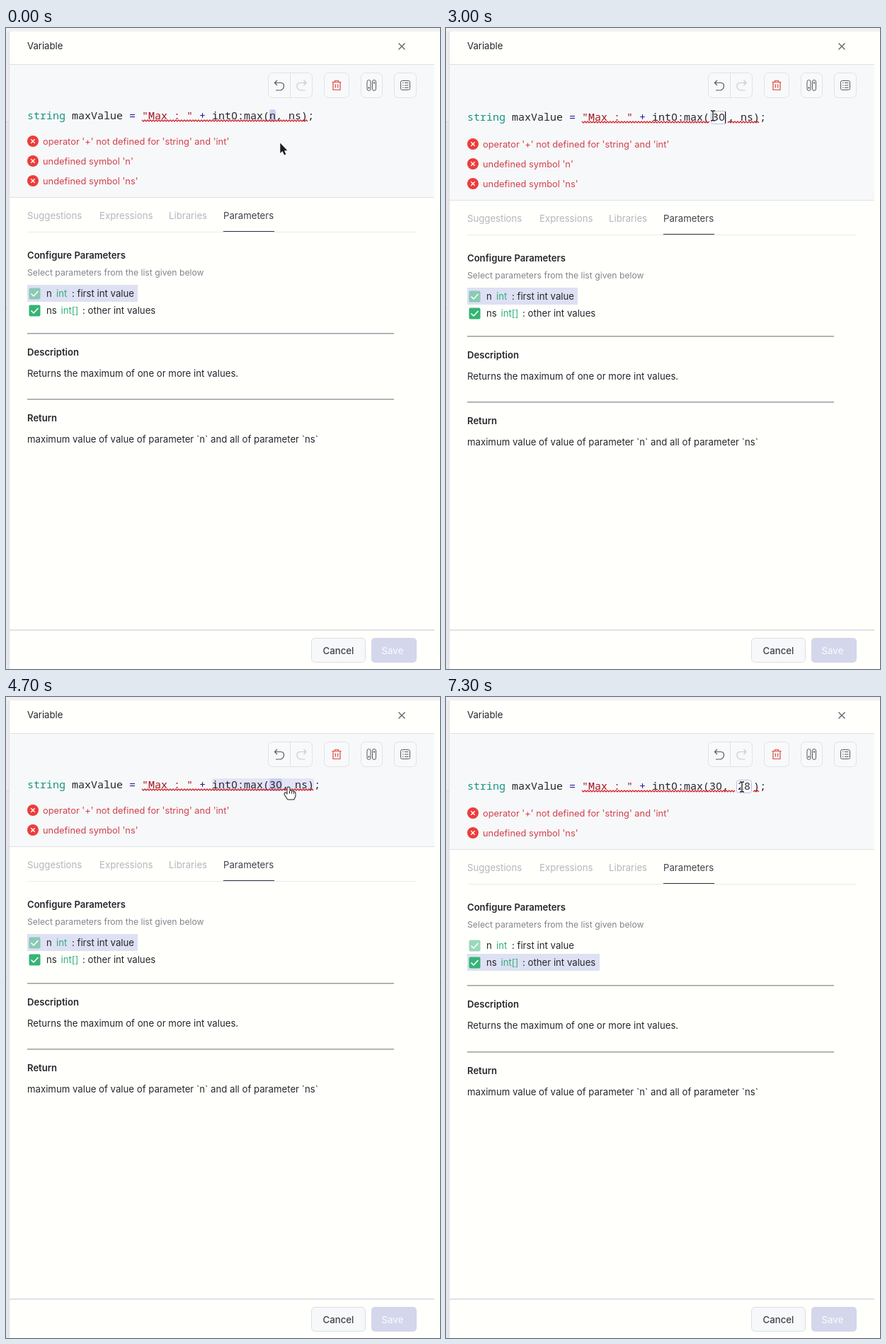
An HTML page with a canvas that plays this animation: 613 by 906 pixels, repeating every 8 s.

```html
<!DOCTYPE html>
<html lang="en">
<head>
<meta charset="utf-8">
<title>Variable editor</title>
<style>
html, body { margin: 0; width: 100%; height: 100%; overflow: hidden; background: #fffffc; }
canvas { display: block; width: 613px; height: 906px; }
</style>
</head>
<body>
<canvas id="stage"></canvas>
<script>
const W = 613, H = 906, LOOP = 8000, CELL = 9;
const canvas = document.getElementById('stage');
const ctx = canvas.getContext('2d');
const dpr = window.devicePixelRatio || 1;
canvas.width = W * dpr;
canvas.height = H * dpr;

const INK = '#25262c', RED = '#d0414e', GREEN = '#36b475', PALE = '#dee0f3';
const UI = 'Inter, "Open Sans", sans-serif';
const MONO = '15px "Noto Sans Mono", "DejaVu Sans Mono", monospace';
const ZERO = '15px "Noto Sans", "Open Sans", sans-serif';

// Each row applies from its time on: editor state.
const STATES = [
  { at: 0, args: ['n', 'ns'], pick: 0 },
  { at: 1300, args: ['n', 'ns'], pick: 0, edit: true, selected: true },
  { at: 2300, args: ['3', 'ns'], pick: 0, edit: true, caret: true },
  { at: 2500, args: ['3', 'ns'], pick: 0, edit: true },
  { at: 3000, args: ['30', 'ns'], pick: 0, edit: true, caret: true },
  { at: 3100, args: ['30', 'ns'], pick: 0, edit: true, caret: true, fixed: true },
  { at: 3400, args: ['30', 'ns'], pick: 0, fixed: true, gap: true },
  { at: 4100, args: ['30', 'ns'], pick: 0, fixed: true },
  { at: 4600, args: ['30', 'ns'], pick: 0, fixed: true, hover: 'call' },
  { at: 4900, args: ['30', 'ns'], pick: 0, fixed: true, hover: 'last' },
  { at: 5300, args: ['30', 'ns'], pick: 1, fixed: true },
  { at: 6000, args: ['30', 'ns'], pick: 1, fixed: true, edit: true, selected: true },
  { at: 6700, args: ['30', '2'], pick: 1, fixed: true, edit: true, caret: true },
  { at: 7200, args: ['30', '28'], pick: 1, fixed: true, edit: true, caret: true },
  { at: 7300, args: ['30', '28'], pick: 1, fixed: true, edit: true }
];

// Pointer steps: time, shape, hot spot.
const POINTER = [
  { at: 0, draw: arrow, x: 387, y: 162 },
  { at: 100, draw: arrow, x: 387, y: 164 },
  { at: 200, draw: arrow, x: 387, y: 165 },
  { at: 400, draw: arrow, x: 376, y: 151 },
  { at: 600, draw: arrow, x: 380, y: 141 },
  { at: 700, draw: hand, x: 379, y: 131 },
  { at: 800, draw: hand, x: 375, y: 123 },
  { at: 900, draw: hand, x: 378, y: 121 },
  { at: 1300, draw: beam, x: 377, y: 124 },
  { at: 3500, draw: hand, x: 378, y: 121 },
  { at: 4600, draw: hand, x: 389, y: 124 },
  { at: 4700, draw: hand, x: 399, y: 127 },
  { at: 4800, draw: hand, x: 410, y: 128 },
  { at: 4900, draw: hand, x: 416, y: 128 },
  { at: 5100, draw: hand, x: 420, y: 124 },
  { at: 6000, draw: beam, x: 418, y: 127 }
];

const current = (list, t) => list.filter(s => s.at <= t).pop();

function rect(x, y, w, h, color) {
  ctx.fillStyle = color;
  ctx.fillRect(x, y, w, h);
}

function box(x, y, w, h, r, fill, stroke) {
  ctx.beginPath();
  ctx.roundRect(x, y, w, h, r);
  if (fill) { ctx.fillStyle = fill; ctx.fill(); }
  if (stroke) { ctx.strokeStyle = stroke; ctx.lineWidth = 1; ctx.stroke(); }
}

function path(d, color, width = 1.2) {
  ctx.strokeStyle = color;
  ctx.lineWidth = width;
  ctx.stroke(new Path2D(d));
}

function at(x, y, draw) {
  ctx.save();
  ctx.translate(x, y);
  draw();
  ctx.restore();
}

// y is the middle of the capitals
function text(str, x, y, { color = INK, size = 13.2, weight = 400, align = 'left' } = {}) {
  ctx.font = `${weight} ${size}px ${UI}`;
  ctx.fillStyle = color;
  ctx.textAlign = align;
  ctx.fillText(str, x, y + 5);
}

function frame() {
  rect(0, 0, W, H, '#fffffc');
  rect(0, 0, 5, H, '#e5e5ea');
  rect(0, 5, 4, 127, '#ececee');
  rect(4, 5, 1, H, '#dcdce2');
  rect(0, 132, 5, 1, '#d8d8df');
  rect(0, 396, 5, 1, '#d8d8df');
  rect(0, 0, W, 5, '#f1f1f1');
  text('Variable', 30, 25);
  at(559, 26, () => path('M-4.5-4.5L4.5 4.5M4.5-4.5L-4.5 4.5', '#62636b', 1.4));

  rect(5, 850, 600, 2, '#e1e2e8');
  box(431.5, 862.5, 76, 34, 5, '#f7f8fa', '#dcdee7');
  text('Cancel', 469.5, 880, { color: '#40404b', weight: 500, align: 'center' });
  box(516, 862, 64, 35, 5, '#d4d6eb');
  text('Save', 546, 880, { color: '#f7f7fd', weight: 500, align: 'center' });
}

function toolbar() {
  const edge = '#e0e2e8', dark = '#595a63';
  for (const [x, w] of [[370, 63], [449, 36], [501, 31], [548, 32]])
    box(x + .5, 63.5, w - 1, 35, 6, '#f8f9fa', edge);
  rect(401, 64, 1, 35, edge);

  const undo = 'M-3-7.5L-6.5-4L-3-.5M-6.5-4H2Q6.5-4 6.5 .5T2 6.5H-5';
  at(386, 81.5, () => path(undo, dark));
  at(417.5, 81.5, () => { ctx.scale(-1, 1); path(undo, '#c9cad0'); });
  at(467, 81, () =>
    path('M-6.5-4.5H6.5M-2.5-4.5V-6.5H2.5V-4.5M-5-4.5V6.5H5V-4.5M-1.7-1.5V3.5M1.7-1.5V3.5', '#e2483f'));
  for (const [x, dot] of [[512.5, 84.5], [520, 77.5]]) {
    box(x - 2.5, 73.5, 5, 15, 2.5, null, dark);
    rect(x - 1, dot - 1, 2, 2, dark);
  }
  box(557.5, 74.5, 13, 13, 2, null, dark);
  for (let y = 77.5; y < 86; y += 3.5)
    path(`M560 ${y}h1.5M563 ${y}h5.5`, dark, 1.1);
}

function glyphs(str, x, y, color) {
  ctx.fillStyle = color;
  ctx.textAlign = 'center';
  [...str].forEach((ch, i) => {
    ctx.font = ch === '0' ? ZERO : MONO;
    ctx.fillText(ch, x + (i + .5) * CELL, y);
  });
}

function squiggle(x0, x1, y) {
  ctx.beginPath();
  for (let x = x0; x <= x1; x += 2)
    ctx.lineTo(x, y + (((x - 192) / 2) % 2 ? 1 : -1));
  ctx.strokeStyle = '#d51d26';
  ctx.lineWidth = 1.2;
  ctx.stroke();
}

function field(s, str, x, width, y) {
  box(x + 2.5, y - 13.5, width - 5, 18, 3, '#fdfdff', '#b3c0ea');
  if (s.selected) rect(x + 4, y - 13, str.length * CELL, 17, '#c6c6c8');
  glyphs(str, x + 4, y, INK);
  if (s.caret) rect(x + 4 + str.length * CELL, y - 13, 1, 17, '#111');
}

function code(s) {
  const y = s.edit ? 131 : 129;
  const [a, b] = s.args;
  const tokens = [
    ['string ', '#169382'], ['maxValue ', INK], ['= ', '#2a1ba8'], ['"Max : "', '#a31521'],
    [' + ', '#1b1b8c'], ['int0:max(', INK], [a, INK, 0], [', ', INK], [b, INK, 1], [')', INK], [';', INK]
  ];
  let x = 30, hole = null;
  if (s.hover === 'call') box(291, y - 14, 144, 18, 3, '#e3e5f6');
  for (const [str, color, arg] of tokens) {
    const width = str.length * CELL;
    let step = width;
    if (s.edit && arg === s.pick) {
      step = Math.max(20, width + 8);
      hole = [x, x + step];
      field(s, str, x, step, y);
    } else {
      if (arg === s.pick || (arg === 1 && s.hover === 'last'))
        box(x, y - 14, width, 18, 3, '#ccd0f1');
      glyphs(str, x, y, color);
    }
    x += step;
  }
  if (s.gap) hole = [371, 392];
  const end = x - CELL;
  if (hole) {
    squiggle(192, hole[0], y + 2);
    squiggle(hole[1], end, y + 2);
  } else squiggle(192, end, y + 2);
}

function errors(s, dy) {
  const list = ["operator '+' not defined for 'string' and 'int'"];
  if (!s.fixed) list.push("undefined symbol 'n'");
  list.push("undefined symbol 'ns'");
  list.forEach((msg, i) => {
    const y = 160 + dy + i * 28;
    ctx.beginPath();
    ctx.arc(38, y, 8, 0, 7);
    ctx.fillStyle = '#ec3d3b';
    ctx.fill();
    at(38, y, () => path('M-2.7-2.7L2.7 2.7M2.7-2.7L-2.7 2.7', '#fff', 1.4));
    text(msg, 52, y, { color: RED, size: 12.85 });
  });
}

function param(y, on, dim, width, name, type, typeX, note, noteX) {
  if (on) rect(30, y - 12, width, 24, PALE);
  ctx.globalAlpha = dim ? .5 : 1;
  box(32.5, y - 7.5, 16, 16, 2, GREEN);
  ctx.globalAlpha = 1;
  at(40.5, y + .5, () => path('M-5 0L-1.5 3.5L5-3.5', '#fff', 1.6));
  text(name, 57, y);
  text(type, typeX, y, { color: '#2fae79' });
  text(note, noteX, y);
}

function details(s, top) {
  const lead = { weight: 600, size: 13.1 };
  const rule = y => rect(30, y - 1, 518, 1.5, '#9b9ca0');
  rect(5, top(239), 600, 1, '#dfe1e7');
  rect(30, top(288), 550, 1, '#e9eaed');
  rect(307, top(287), 72, 1, '#34353d');
  [['Suggestions', 30], ['Expressions', 132], ['Libraries', 230]].forEach(([tab, x]) =>
    text(tab, x, top(265), { color: '#b5b5be' }));
  text('Parameters', 307, top(265), { color: '#40404b' });

  text('Configure Parameters', 30, top(321), lead);
  text('Select parameters from the list given below', 30, top(345), { color: '#83848c', size: 12.2 });
  param(top(375), s.pick === 0, true, 156, 'n', 'int', 71, ': first int value', 93);
  param(top(399), s.pick === 1, false, 187, 'ns', 'int[]', 77.5, ': other int values', 108);

  rule(top(432.2));
  text('Description', 30, top(458.2), lead);
  text('Returns the maximum of one or more int values.', 30, top(488.2));
  rule(top(525.4));
  text('Return', 30, top(551.4), lead);
  text('maximum value of value of parameter `n` and all of parameter `ns`', 30, top(581.4));
}

function shape(d, fill, stroke, width) {
  const p = new Path2D(d);
  ctx.lineWidth = width;
  ctx.strokeStyle = stroke;
  ctx.stroke(p);
  ctx.fillStyle = fill;
  ctx.fill(p);
}

function arrow() {
  shape('M.3 .5V15L3.5 12.1L6 17.6L8.4 16.6L6 11.2H10.4Z', '#1c1c1e', '#fff', 1.4);
}

function hand() {
  shape('M-1.5 1.5Q0-.5 1.5 1.5V6Q3.5 4.8 4.6 6.6Q6.5 5.7 7.4 7.4Q9.3 7 9.5 9V13L7.5 17.5H-1L-5.5 10.5Q-5.5 8-4 8.6L-1.5 11Z',
    '#fff', '#1c1c1e', 2);
  path('M1.5 6V9.5M4.6 6.6V9.8M7.4 7.4V10', '#1c1c1e', 1);
}

function beam() {
  const d = 'M-3-7H-1L0-6L1-7H3M0-6V6M-3 7H-1L0 6L1 7H3';
  path(d, '#fff', 3);
  path(d, '#1c1c1e', 1.3);
}

function render(t) {
  const s = current(STATES, t);
  const shift = (s.edit ? 3.85 : 0) - (s.fixed ? 27.6 : 0);
  const top = y => Math.round(y + shift);
  ctx.setTransform(dpr, 0, 0, dpr, 0, 0);
  ctx.lineJoin = 'round';
  frame();
  rect(5, 51, 600, 1, '#dfe1e7');
  rect(5, 52, 600, top(239) - 52, '#f7f8f9');
  toolbar();
  code(s);
  errors(s, s.edit ? 4 : 0);
  details(s, top);
  const p = current(POINTER, t);
  at(p.x, p.y, p.draw);
}

const start = performance.now();
function tick() {
  render((performance.now() - start) % LOOP);
  requestAnimationFrame(tick);
}
tick();
</script>
</body>
</html>
```
